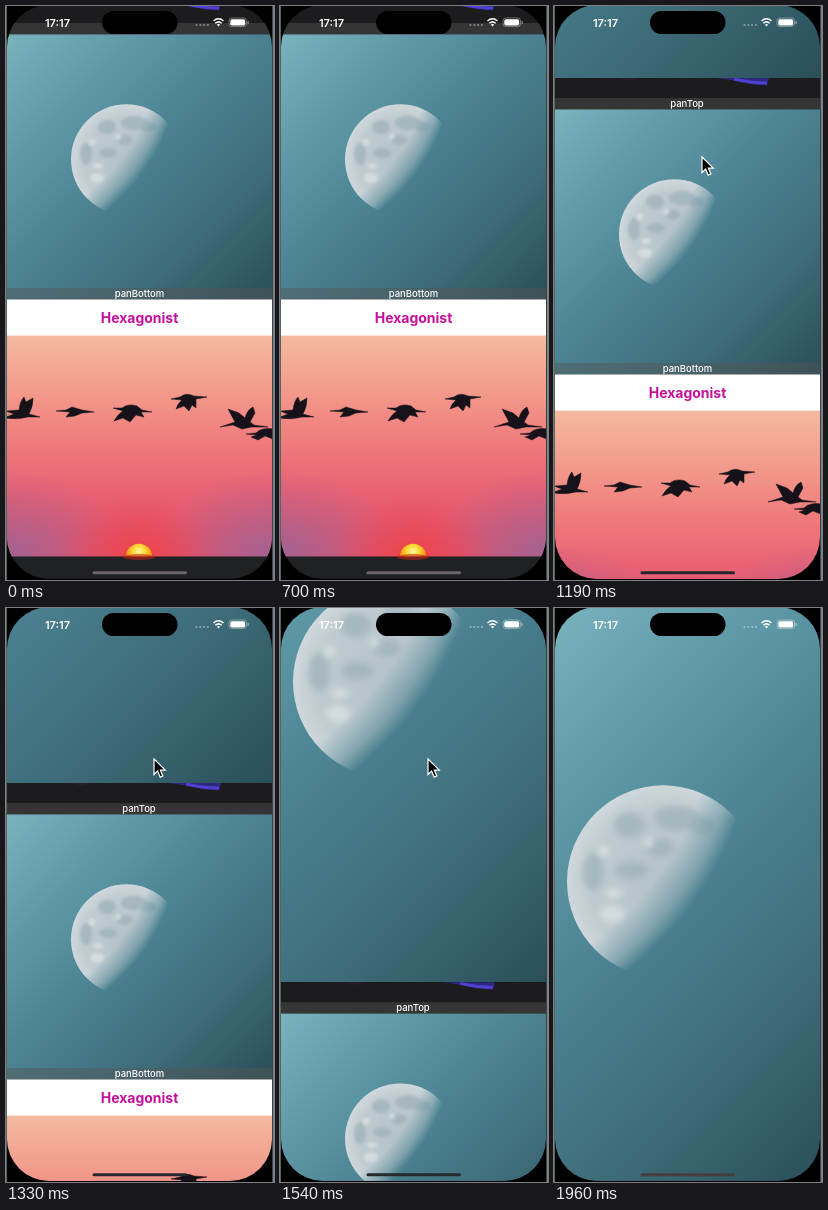
Write an HTML page that moves like this. It is 268 by 574 pixels and loops after 2520 ms.

```html
<!DOCTYPE html>
<html lang="en">
<head>
<meta charset="utf-8">
<title>Panning pages</title>
<style>
  html, body { margin: 0; width: 100%; height: 100%; overflow: hidden; background: #000; }
  svg { display: block; width: 268px; height: 574px; }
  text { font-family: Inter, Roboto, sans-serif; text-anchor: middle; }
  .label { font-size: 9.5px; font-weight: 500; fill: #fff; }
  .strip { fill: #555; opacity: .45; }
</style>
</head>
<body>
<svg viewBox="0 0 268 574">
  <defs>
    <clipPath id="screen"><rect x="1" y="-1" width="265" height="574" rx="42"/></clipPath>
    <linearGradient id="teal">
      <stop offset="0" stop-color="#79b3be"/>
      <stop offset=".25" stop-color="#5f99a7"/>
      <stop offset=".5" stop-color="#4a8090"/>
      <stop offset=".72" stop-color="#3f6e7b"/>
      <stop offset="1" stop-color="#2a4f58"/>
    </linearGradient>
    <linearGradient id="tealSmall" href="#teal" gradientUnits="userSpaceOnUse" x1="1" y1="28" x2="266" y2="293"/>
    <linearGradient id="tealBig" href="#teal" gradientUnits="userSpaceOnUse" x1="0" y1="-577" x2="420" y2="-157"/>
    <radialGradient id="fade" gradientUnits="userSpaceOnUse" cx="-23" cy="50" r="198">
      <stop offset=".87" stop-color="#fff"/>
      <stop offset=".95" stop-color="#fff" stop-opacity=".5"/>
      <stop offset="1" stop-color="#fff" stop-opacity="0"/>
    </radialGradient>
    <radialGradient id="rock" gradientUnits="userSpaceOnUse" cx="122" cy="155" r="58">
      <stop offset="0" stop-color="#b3c2c8"/>
      <stop offset=".75" stop-color="#bfcbd0"/>
      <stop offset="1" stop-color="#d0d9dc"/>
    </radialGradient>
    <filter id="soft" x="-50%" y="-50%" width="200%" height="200%"><feGaussianBlur stdDeviation="1.8"/></filter>
    <mask id="night"><circle cx="120.3" cy="153.5" r="55.3" fill="url(#fade)"/></mask>
    <g id="moon" mask="url(#night)">
      <circle cx="120.3" cy="153.5" r="56" fill="url(#rock)"/>
      <g filter="url(#soft)" fill="#9db0b8" opacity=".7">
        <ellipse cx="128" cy="117" rx="13" ry="7"/>
        <ellipse cx="101" cy="121" rx="9" ry="7"/>
        <ellipse cx="80" cy="148" rx="6" ry="11"/>
        <ellipse cx="102" cy="147" rx="9" ry="5"/>
        <ellipse cx="142" cy="121" rx="8" ry="5"/>
        <ellipse cx="119" cy="134" rx="8" ry="5"/>
      </g>
      <g filter="url(#soft)" fill="#dde5e8" opacity=".7">
        <circle cx="86" cy="136" r="3.5"/>
        <circle cx="112" cy="131" r="3"/>
        <ellipse cx="91" cy="172" rx="7" ry="5"/>
        <ellipse cx="92" cy="160" rx="5" ry="3"/>
      </g>
    </g>
    <linearGradient id="dusk" x2="0" y2="1">
      <stop offset="0" stop-color="#f4b9a0"/>
      <stop offset=".2" stop-color="#f3a18f"/>
      <stop offset=".45" stop-color="#f07f7e"/>
      <stop offset=".7" stop-color="#ea6273"/>
      <stop offset="1" stop-color="#dc5069"/>
    </linearGradient>
    <radialGradient id="haze">
      <stop offset="0" stop-color="#9a6598" stop-opacity=".9"/>
      <stop offset=".45" stop-color="#a86292" stop-opacity=".55"/>
      <stop offset="1" stop-color="#b0608f" stop-opacity="0"/>
    </radialGradient>
    <radialGradient id="glow">
      <stop offset="0" stop-color="#f53a2c"/>
      <stop offset=".25" stop-color="#ec4650" stop-opacity=".85"/>
      <stop offset="1" stop-color="#ec4a5e" stop-opacity="0"/>
    </radialGradient>
    <radialGradient id="sun" cy=".3">
      <stop offset="0" stop-color="#fff6a0"/>
      <stop offset=".5" stop-color="#fcd62f"/>
      <stop offset="1" stop-color="#f8861c"/>
    </radialGradient>
    <clipPath id="sky"><rect x="1" y="329" width="266" height="222"/></clipPath>
  </defs>

  <g clip-path="url(#screen)">
    <g id="page">
      <rect y="-577" width="268" height="574" fill="url(#tealBig)"/>
      <use href="#moon" transform="translate(-100.1 -570.5) scale(1.74)"/>

      <rect y="-3" width="268" height="32" fill="#1c1b1d"/>
      <path d="M162-3Q188 0 196 3L213 4.5 215-3Z" fill="#2e2780"/>
      <path d="M180-2Q196 2 213 2" fill="none" stroke="#4f40d0" stroke-width="3"/>
      <path d="M62-3h22l-7 3z" fill="#2d1a2c"/>
      <rect class="strip" y="17" width="268" height="11.5"/>
      <text class="label" x="133" y="26">panTop</text>

      <rect y="28.4" width="268" height="265" fill="url(#tealSmall)"/>
      <use href="#moon"/>
      <rect class="strip" y="282" width="268" height="11.4"/>
      <text class="label" x="133.5" y="291">panBottom</text>

      <rect y="293.4" width="268" height="37" fill="#fff"/>
      <text x="133.5" y="317" font-size="14" font-weight="700" fill="#c4109c">Hexagonist</text>

      <g clip-path="url(#sky)">
        <rect y="329.6" width="268" height="222" fill="url(#dusk)"/>
        <ellipse cx="0" cy="548" rx="120" ry="85" fill="url(#haze)"/>
        <ellipse cx="268" cy="548" rx="120" ry="85" fill="url(#haze)"/>
        <ellipse cx="133" cy="551" rx="80" ry="65" fill="url(#glow)"/>
        <circle cx="133" cy="551" r="13.3" fill="url(#sun)"/>
      </g>
      <rect y="550.5" width="268" height="44" fill="#1f2122"/>
      <ellipse cx="133" cy="551" rx="16" ry="3" fill="#c02018" opacity=".6"/>
      <g id="birds" fill="#17121a" stroke="#17121a" stroke-width=".5" stroke-linejoin="round"></g>
    </g>
  </g>

  <rect width="1" height="574" fill="#56665c"/>
  <rect x="266.5" width="1.5" height="574" fill="#77858a"/>
  <rect x="96" y="5" width="75.5" height="23" rx="11.5"/>

  <g fill="#fff">
    <text x="51.5" y="20.5" font-size="11" font-weight="600">17:17</text>
    <g opacity=".4">
      <circle cx="190.5" cy="19" r="1.1"/><circle cx="194.3" cy="19" r="1.1"/>
      <circle cx="198.1" cy="19" r="1.1"/><circle cx="201.9" cy="19" r="1.1"/>
    </g>
    <path d="M212.5 20.5l-1.7-1.9q1.7-1.3 3.4 0z"/>
    <path d="M207.5 15q5-4.4 10 0M209.3 17.2q3.2-2.7 6.4 0" fill="none" stroke="#fff" stroke-width="1.5"/>
    <rect x="223" y="12" width="17.5" height="8.6" rx="2.8" fill="none" stroke="#fff" stroke-width=".8" opacity=".45"/>
    <rect x="224.3" y="13.2" width="14.9" height="6.2" rx="1.7"/>
    <rect x="241.5" y="15" width="1.2" height="3" rx=".6" opacity=".5"/>
  </g>
  <rect id="home" x="86.5" y="565.3" width="94.5" height="3" rx="1.5"/>
  <path id="cursor" d="M148 151v15.5l3.6-3.4 2.6 6 2.7-1.2-2.6-5.8h5z" stroke="#fff" stroke-width="1.2"/>
</svg>
<script>
const STEP = 70, LOOP = 2520;
const $ = id => document.getElementById(id);

// Crane silhouettes: long thin necks, wings at different beats.
$('birds').innerHTML = [
  'M0 411L8 408 0 405 13 404Q14 395 18 391L20 396 27 392Q27 401 23 408L34 411 22 411Q12 414 0 412Z',
  'M50 405L60 404 66 401 76 404 88 406 76 407 69 410 60 411 64 406Z',
  'M107 402L116 402Q122 397 131 400L136 404 146 406 135 406 138 411 130 409 124 416 117 412 108 415Q112 408 117 405Z',
  'M165 393L174 391Q180 386 188 390L201 391 190 393 190 402 186 399 183 405 178 400 170 403Q172 397 176 394Z',
  'M214 421L229 416 222 403 233 407 239 412Q241 404 247 401L249 407 244 416 248 419 262 421 246 421 236 423 227 419Z',
  'M240 428L250 427Q256 421 267 423V433L259 430 252 434 245 431 251 429Z'
].map(d => `<path d="${d}"/>`).join('');

// [time, scroll offset, speed per step]
const keys = [
  [770, 0, 0], [980, 5, 5], [1190, 75, 42],
  [1470, 307, 68], [1680, 504, 50], [1960, 577, 0]
];

function scrollAt(t) {
  if (t <= keys[0][0]) return 0;
  const i = keys.findIndex(k => t < k[0]);
  if (i < 0) return 577;
  const [t0, y0, v0] = keys[i - 1], [t1, y1, v1] = keys[i];
  const n = (t1 - t0) / STEP, u = (t - t0) / (t1 - t0), w = 1 - u;
  return w * w * ((1 + 2 * u) * y0 + u * n * v0) +
         u * u * ((3 - 2 * u) * y1 - w * n * v1);
}

function draw(now) {
  const t = Math.floor(now % LOOP / STEP) * STEP;
  const y = scrollAt(t);
  $('page').setAttribute('transform', `translate(0 ${y.toFixed(1)})`);
  $('home').setAttribute('fill', y < 30 ? '#6b676a' : t < 1960 ? '#25292b' : '#443f3f');
  $('cursor').style.display = t >= 840 && t < 1680 ? '' : 'none';
}

const start = performance.now();
function tick() {
  draw(performance.now() - start);
  requestAnimationFrame(tick);
}
tick();
</script>
</body>
</html>
```
